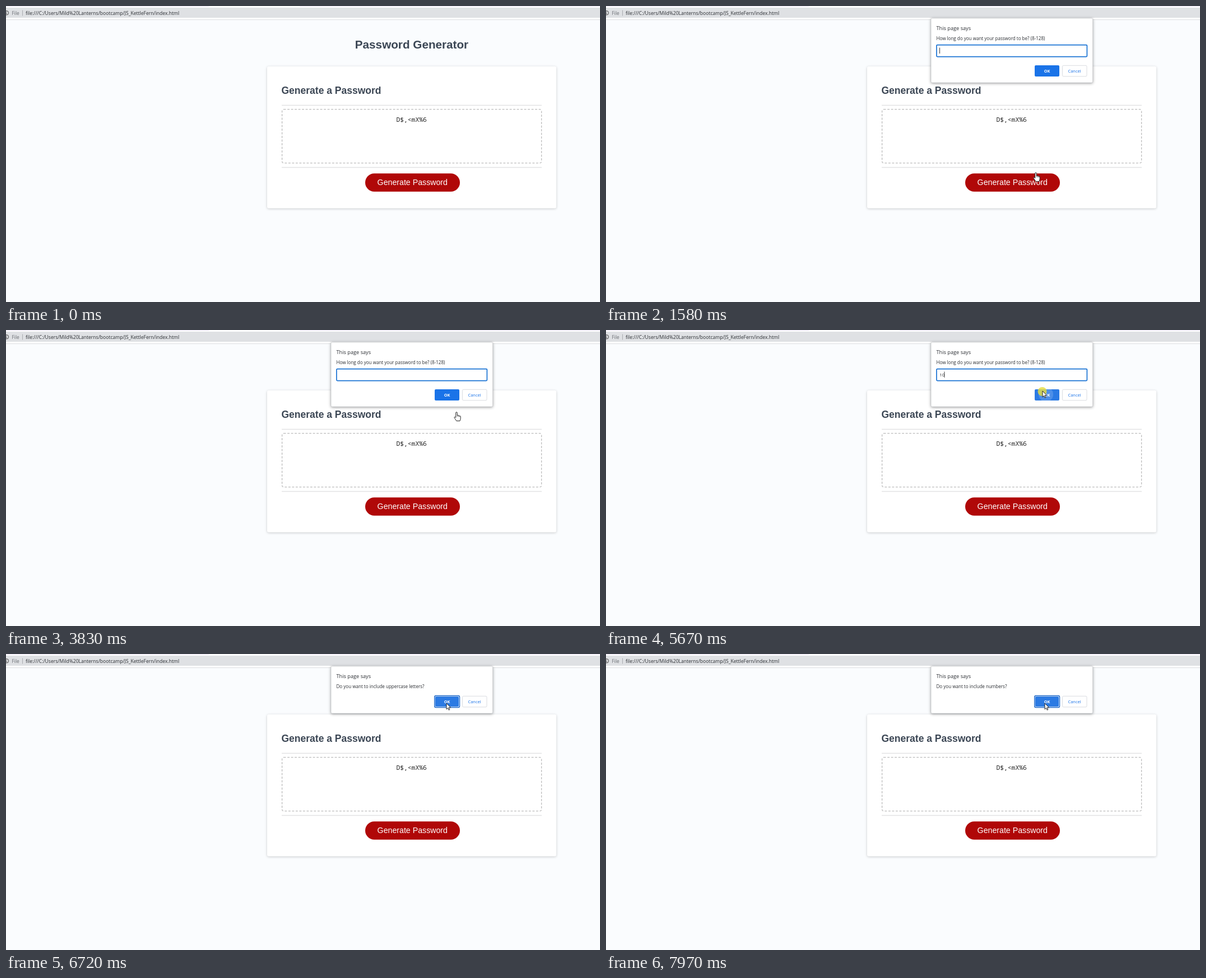
Write an HTML page that moves like this. It is 1060 px wide and 529 px high and loops after 8000 ms.

```html
<!DOCTYPE html>
<html lang="en">
<head>
<meta charset="utf-8">
<title>Password Generator</title>
<style>
  html, body { margin: 0; width: 100%; height: 100%; overflow: hidden; background: #fafcfe; }
  svg { display: block; width: 1060px; height: 529px; }
  text { white-space: pre; }
  .page { font-family: "Liberation Sans", Arial, sans-serif; }
  .head { font-weight: 700; fill: #3b4654; }
  .mono { font: 11.3px "Noto Sans Mono", monospace; fill: #222; }
  .ui { font-family: "Open Sans", "Noto Sans", sans-serif; font-size: 8.05px; fill: #2b2e33; }
  .mid { text-anchor: middle; }
  .card { filter: drop-shadow(0 1px 2px rgba(0, 0, 0, .2)); }
  .sheet { filter: drop-shadow(0 1px 2.5px rgba(0, 0, 0, .4)); }
  .pointer { fill: #fff; stroke: #111; stroke-width: .9; stroke-linejoin: round; }
</style>
</head>
<body>
<svg viewBox="0 0 1060 529">
  <defs><clipPath id="okClip"><rect x="765" y="106" width="44" height="20" rx="2"/></clipPath></defs>

  <!-- browser bar -->
  <rect width="1060" height="24" fill="#fff"/>
  <path d="M0 .5H362M524 .5H1060" stroke="#eee6f8"/>
  <rect y="3" width="1060" height="18" fill="#dfe1e4"/>
  <path d="M0 24.5H1060" stroke="#dcdee1"/>
  <circle cx="1" cy="12.3" r="3.7" fill="none" stroke="#444"/>
  <path d="M1 11.8V14.6M1 9.8V10.8" stroke="#444"/>
  <path d="M29.5 7.5V17.5" stroke="#a9acb0"/>
  <text class="ui" x="10.5" y="15.5" style="font-size:8.4px;fill:#696d72">File</text>
  <text class="ui" x="35" y="15.5" style="font-size:8.57px">file:///C:/Users/Mild%20Lanterns/bootcamp/JS_KettleFern/index.html</text>

  <!-- page -->
  <g class="page">
    <text class="head mid" x="724" y="76" font-size="20.7">Password Generator</text>
    <rect class="card" x="466" y="108" width="516" height="253.500" rx="3" fill="#fff"/>
    <text class="head" x="491.500" y="157.400" font-size="17.5">Generate a Password</text>
    <path d="M492 177.500H956M492 288.500H956" stroke="#e2e3e4" stroke-width="1.300"/>
    <rect x="492.600" y="184.700" width="463" height="96" rx="3" fill="#fff" stroke="#bcbcbc" stroke-width="1.300" stroke-dasharray="3.9 2.6"/>
    <text class="mono" x="696.500" y="207">D$,&lt;mX%6</text>
    <rect x="641" y="299.300" width="169" height="32.400" rx="16.200" fill="#b00808"/>
    <text class="mid" x="725.300" y="320" font-size="14.2" fill="#fff">Generate Password</text>
  </g>

  <!-- dialog -->
  <g id="dialog">
    <rect id="sheet" class="sheet" x="580" y="22" width="288.500" height="115" rx="2" fill="#fff" stroke="#c4c6c9" stroke-width=".6"/>
    <text class="ui" x="589.500" y="43.400" style="font-size:9.2px">This page says</text>
    <text id="message" class="ui" x="589.500" y="61.300"></text>
    <g id="field">
      <rect x="589.900" y="69.600" width="268.500" height="21" rx="1.500" fill="#fff" stroke="#1a73d4" stroke-width="1.700"/>
      <text id="typed" class="ui" x="595.300" y="82.700" style="font-size:7.7px"></text>
      <path id="caret" d="M0 74.500V85" stroke="#222" stroke-width=".9"/>
    </g>
    <g id="buttons">
      <rect id="ring" x="764.700" y="105.500" width="44.800" height="21" rx="2.500" fill="#fff" stroke="#1a66c8" stroke-width="1.400"/>
      <rect id="ok" x="765" y="106" width="44" height="20" rx="2"/>
      <circle id="ripple" cx="785" cy="115" fill="#fff" clip-path="url(#okClip)"/>
      <text class="ui mid" x="787" y="118.700" style="font-size:7.3px;font-weight:700;fill:#fff">OK</text>
      <rect x="814.500" y="106.300" width="43.500" height="19.500" rx="2" fill="#fff" stroke="#dadce0"/>
      <text class="ui mid" x="836" y="118.700" style="font-size:7.5px;font-weight:500;fill:#1a73e8">Cancel</text>
    </g>
  </g>

  <!-- mouse -->
  <g id="mouse">
    <circle id="halo" cx="-.5" cy="1" r="8" fill="#e6dc3c"/>
    <path id="arrow" class="pointer" d="M0 0V10.800L2.500 8.400 4.100 12.200 5.800 11.500 4.200 7.800H7.700Z"/>
    <g id="hand" class="pointer">
      <path d="M-1.300 8.500V1A1.250 1.250 0 0 1 1.200 1V5.500L2 5.200Q3.300 5 3.600 6Q5 5.500 5.500 6.600Q7 6.300 7.200 7.800V11Q7 13 6 15.500H-.2Q-1.500 13 -3.700 10.200Q-4.600 8.800 -3.600 8.300Q-2.600 8 -1.300 9.600Z"/>
      <path d="M1.300 5.500V8M3.500 6V8.300M5.400 6.700V8.500" stroke-width=".6"/>
    </g>
    <path id="beam" d="M-2 -6.500H2M0 -6.500V6.500M-2 6.500H2" stroke="#111" fill="none"/>
  </g>
</svg>

<script>
const LOOP = 8000;
const ui = {};
document.querySelectorAll('[id]').forEach(el => ui[el.id] = el);

// open / close times
const dialogs = [
  { open: 1250, close: 5715, prompt: true, text: 'How long do you want your password to be? (8-128)' },
  { open: 5800, close: 6500, text: 'Do you want to include lowercase letters?' },
  { open: 6580, close: 7355, text: 'Do you want to include uppercase letters?' },
  { open: 7430, close: 9000, text: 'Do you want to include numbers?' }
];
const OPEN_MS = 140, CLOSE_MS = 75;

// time, x, y of the hot spot
const path = [
  [190, 914, 493], [480, 800, 340], [680, 691, 208], [980, 764, 312], [1120, 765, 315],
  [1400, 767, 298], [1600, 767, 298], [1850, 744, 92], [2300, 743, 88], [2480, 743, 88],
  [3300, 804, 147], [5080, 804, 147], [5540, 779, 109], [5930, 779, 109], [6190, 786, 94],
  [6400, 786, 88], [6720, 786, 88], [6950, 786, 93], [7180, 785, 86], [7440, 785, 86],
  [7640, 786, 99], [7900, 783, 88]
];
const clicks = [1080, 5570, 6420, 7170];
const CLICK_MS = 190;
const caretOff = [[1910, 2300], [2840, 3370], [3830, 4160], [4950, 5470]];

const clamp = v => Math.min(1, Math.max(0, v));
const within = (t, a, b) => t >= a && t < b;
const show = (el, on) => el.style.display = on ? '' : 'none';
const put = (el, x, y) => el.setAttribute('transform', `translate(${x} ${y})`);

function mouseAt(t) {
  const i = path.findIndex(p => p[0] > t);
  if (i < 0) return path[path.length - 1].slice(1);
  if (i === 0) return path[0].slice(1);
  const [t0, x0, y0] = path[i - 1], [t1, x1, y1] = path[i];
  let k = (t - t0) / (t1 - t0);
  k = k * k * (3 - 2 * k);
  return [x0 + (x1 - x0) * k, y0 + (y1 - y0) * k];
}

function drawMouse(t, x, y, click) {
  show(ui.mouse, t >= 190);
  put(ui.mouse, x, y);
  const overText = t < 980 && within(y, 185, 281);
  const hand = within(t, 900, 5250);
  show(ui.beam, overText);
  show(ui.hand, hand && !overText);
  show(ui.arrow, !hand && !overText);
  show(ui.halo, click !== undefined);
  if (click !== undefined) ui.halo.setAttribute('opacity', .8 * clamp((click + CLICK_MS - t) / 60));
}

function drawDialog(t, x, y, click) {
  const d = dialogs.find(d => within(t, d.open, d.close + CLOSE_MS));
  show(ui.dialog, d);
  if (!d) return;
  const closing = t >= d.close;
  const away = closing ? (t - d.close) / CLOSE_MS : (1 - clamp((t - d.open) / OPEN_MS)) ** 2;
  put(ui.dialog, 0, -8 * away);
  ui.dialog.setAttribute('opacity', 1 - away ** 3);

  const lift = d.prompt ? 0 : 31;
  ui.message.textContent = d.text;
  ui.sheet.setAttribute('height', 115 - lift);
  put(ui.buttons, 0, -lift);
  show(ui.field, d.prompt);

  const typed = t < 4160 ? '' : t < 4430 ? '1' : '10';
  ui.typed.textContent = typed;
  put(ui.caret, 595.5 + typed.length * 4.2, 0);
  show(ui.caret, !caretOff.some(([a, b]) => within(t, a, b)));

  const hover = !closing && within(x, 765, 809) && within(y, 106 - lift, 126 - lift - 3);
  ui.ok.setAttribute('fill', hover ? '#2b7ae3' : '#1a73e8');
  const ring = !d.prompt && !closing;
  show(ui.ring, ring);
  ui.ok.setAttribute('transform', ring ? 'translate(787 116) scale(.955 .9) translate(-787 -116)' : '');
  const rippling = hover && click !== undefined;
  show(ui.ripple, rippling);
  if (rippling) {
    ui.ripple.setAttribute('r', 4 + (t - click) * .09);
    ui.ripple.setAttribute('opacity', .16);
  }
}

const start = performance.now();
function frame() {
  const t = (performance.now() - start) % LOOP;
  const [x, y] = mouseAt(t);
  const click = clicks.find(c => within(t, c, c + CLICK_MS));
  drawMouse(t, x, y, click);
  drawDialog(t, x, y, click);
  requestAnimationFrame(frame);
}
frame();
</script>
</body>
</html>
```
